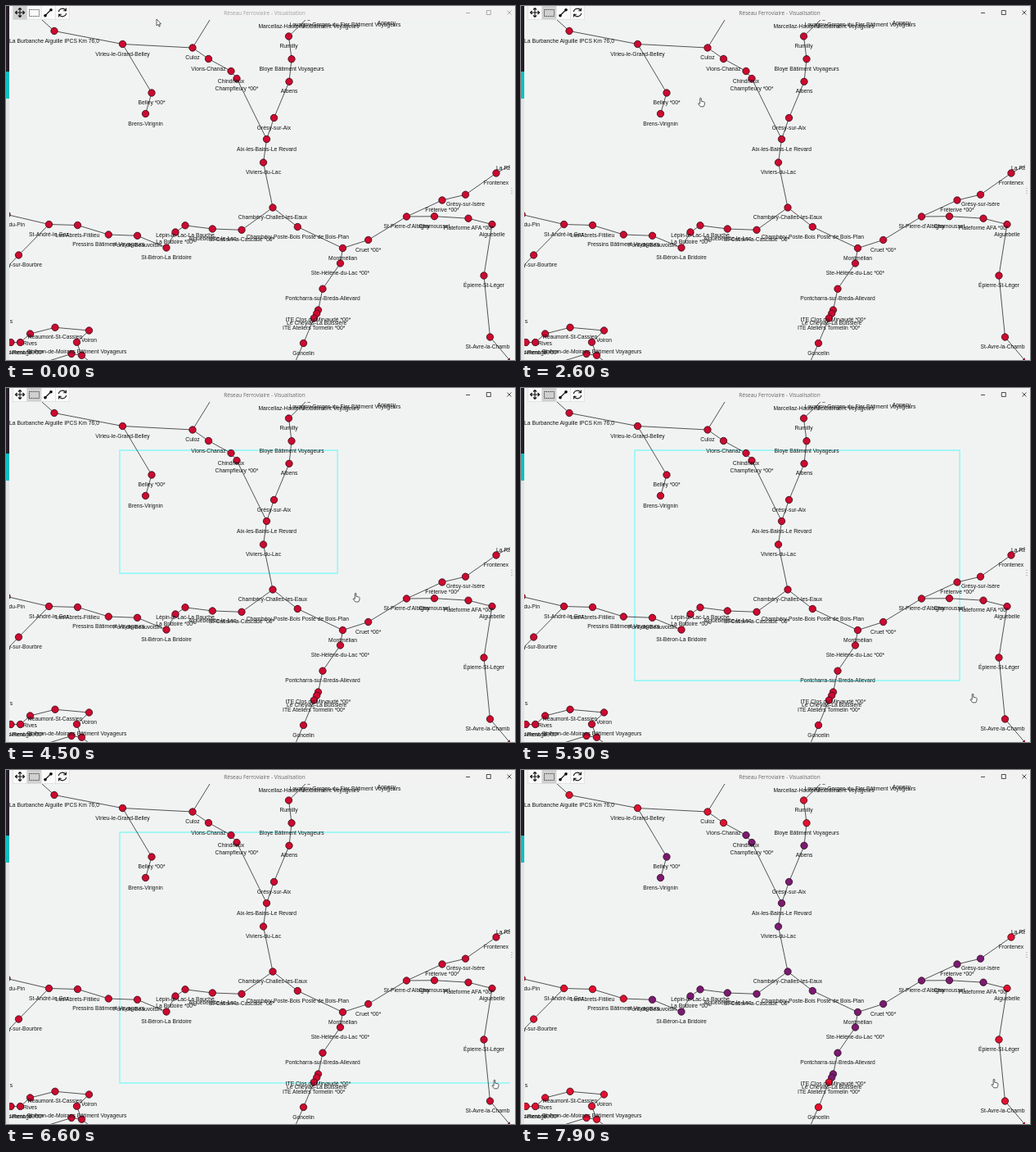
Recreate the animation shown at these times as an HTML page. Size 622 by 432 pixels, loop 8 s.

```html
<!DOCTYPE html>
<html lang="fr">
<head>
<meta charset="utf-8">
<title>Réseau Ferroviaire - Visualisation</title>
<style>
  html, body { margin: 0; width: 100%; height: 100%; overflow: hidden; background: #f1f3f2; }
  svg { display: block; width: 622px; height: 432px; }
  text { font: 6.75px "Liberation Sans", Arial, sans-serif; fill: #151515; text-anchor: middle; }
  #title { font: 6.5px "Open Sans", sans-serif; }
  #tracks path { fill: none; stroke: #2a2a2a; stroke-width: .8; }
  #stations circle { stroke: #2a1018; stroke-width: .8; }
  #icons path { fill: none; stroke: #111; stroke-width: 1.1; }
  #selection { fill: none; stroke: #8ff9f8; stroke-width: 1.6; }
  .cursor { fill: #fff; stroke: #333; stroke-width: .8; stroke-linejoin: round; }
</style>
</head>
<body>
<svg viewBox="0 0 622 432">
  <defs><clipPath id="view"><rect x="4" y="17" width="612" height="415"/></clipPath></defs>
  <rect width="622" height="432" fill="#f1f3f2"/>
  <g clip-path="url(#view)">
    <rect id="selection"/>
    <g id="tracks"></g>
    <g id="stations"></g>
    <g id="labels"></g>
  </g>
  <rect width="622" height="17" fill="#f2f2f2"/>
  <rect width="4" height="432" fill="#e1e5e5"/>
  <rect width="4" height="80" fill="#241f29"/>
  <rect y="80" width="4" height="33" fill="#10bfc0"/>
  <path d="M618 222v1M618 225v1M618 228v1" stroke="#888"/>
  <g id="buttons" stroke="#d8d8d8" stroke-width=".6"></g>
  <g id="icons">
    <path d="M17 2.5v11M11.5 8h11M15 4.5l2-2 2 2M15 11.5l2 2 2-2M13.5 6l-2 2 2 2M20.5 6l2 2-2 2"/>
    <path d="M28.5 4.5h12v8h-12z" stroke-dasharray="1.2 1" style="stroke-width:.8"/>
    <path d="M48 11.5l7-7"/>
    <circle cx="48" cy="11.7" r="1.8"/><circle cx="55" cy="4.7" r="1.8"/>
    <path d="M64.3 7a4.8 4.8 0 0 1 8.6-1.8M73.7 9a4.8 4.8 0 0 1-8.6 1.8M73.4 2.5v3.2h-3.2M64.6 13.5v-3.2h3.2"/>
  </g>
  <text id="title" x="316" y="10.6">Réseau Ferroviaire - Visualisation</text>
  <path id="controls" d="M562 8.5h5M587.3 5.5h5v5h-5zM612.5 5.5l5 5M617.5 5.5l-5 5" fill="none" stroke-width=".8"/>
  <path id="arrow" class="cursor" d="M0 0v8l1.8-1.6 1.2 2.8 1.3-.6-1.2-2.6h2.5z"/>
  <path id="hand" class="cursor" d="M-.8 .6q.8-1 1.6 0v3.6l3.6.9q.8.3.7 1.2l-.5 2.6-.9 1.9h-3.9l-2.9-3.6q.5-1.1 2.3.1z"/>
</svg>
<script>
const LOOP = 8000, CLICK = 1300, PRESS = 4000, RELEASE = 7700;
const ANCHOR = [139, 76];
const $ = id => document.getElementById(id);

function add(parent, tag, attrs, content) {
  const el = document.createElementNS('http://www.w3.org/2000/svg', tag);
  for (const key in attrs) el.setAttribute(key, attrs[key]);
  if (content) el.textContent = content;
  $(parent).append(el);
  return el;
}

const stations = {
  burbanche: [59, 30.5, 'La Burbanche Aiguille IPCS Km 76,0'],
  virieu: [142.5, 46.5, 'Virieu-le-Grand-Belley'],
  culoz: [228, 51, 'Culoz'],
  vions: [247.5, 64.5, 'Vions-Chanaz'],
  chindrieux: [275, 79.5, 'Chindrieux'],
  champfleury: [282, 88.5, 'Champfleury *00*'],
  belley: [178, 106, 'Belley *00*'],
  brens: [170.5, 131.5, 'Brens-Virignin'],
  annecy: [465, 8.5, 'Annecy'],
  lovagny: [414.5, 10.5, 'Lovagny-Gorges-du-Fier Bâtiment Voyageurs'],
  marcellaz: [370, 13, 'Marcellaz-Hauteville Bâtiment Voyageurs'],
  rumilly: [345.5, 37, 'Rumilly'],
  bloye: [349, 64.7, 'Bloye Bâtiment Voyageurs'],
  albens: [346, 92.3, 'Albens'],
  gresyAix: [327.5, 136.5, 'Grésy-sur-Aix'],
  aix: [318.5, 162.5, 'Aix-les-Bains-Le Revard'],
  viviers: [314.5, 191, 'Viviers-du-Lac'],
  chambery: [326, 246, 'Chambéry-Challes-les-Eaux'],
  poste: [356.3, 269.5, 'Chambéry-Poste-Bois Poste de Bois-Plan'],
  cassin: [288, 273.3, 'St-Cassin-la-Cascade *00*'],
  aiguebelette: [252.3, 272, 'Aiguebelette-le-Lac'],
  lepin: [219, 267.8, 'Lépin-le-Lac-La Bauche'],
  bridoire: [207, 276, 'La Bridoire *00*'],
  beron: [196, 295, 'St-Béron-La Bridoire'],
  beauvoisin: [160.5, 280.3, 'Pont-de-Beauvoisin'],
  pressins: [125.3, 279, 'Pressins Bâtiment Voyageurs'],
  abrets: [87.5, 267.5, 'Les Abrets-Fitilieu'],
  andre: [52.5, 266.5, 'St-André-le-Gaz'],
  tour: [1, 254.5, 'La Tour-du-Pin'],
  bourbre: [15.5, 304, ''],
  reaumont: [60, 392.3, 'Réaumont-St-Cassien'],
  rives: [29.5, 400, 'Rives'],
  renage: [17.5, 410.5, 'Rives-Renage *00*'],
  izeaux: [6, 410.5, 'Izeaux Bâtiment *00*'],
  voiron: [101.5, 396, 'Voiron'],
  moirans: [86.5, 410.3, 'St-Jean-de-Moirans Bâtiment Voyageurs'],
  southA: [80, 424.5, ''],
  southB: [92.5, 426.3, ''],
  montmelian: [411.5, 295.5, 'Montmélian'],
  cruet: [442.7, 285.5, 'Cruet *00*'],
  helene: [408.5, 314, 'Ste-Hélène-du-Lac *00*'],
  pontcharra: [387, 345.2, 'Pontcharra-sur-Breda-Allevard'],
  clos: [381.5, 371, 'ITE Clos du Mirvaudé *00*'],
  cheylas: [379.7, 375.3, 'Le Cheylas-La Buissière'],
  ateliers: [376.3, 381, 'ITE Ateliers Tormelin *00*'],
  goncelin: [363.5, 411.5, 'Goncelin'],
  pierre: [489.5, 257, "St-Pierre-d'Albigny"],
  chamousset: [523.5, 256.7, 'Chamousset'],
  plateforme: [565, 259.2, 'Plateforme AFA *00*'],
  aiguebelle: [594, 266.5, 'Aiguebelle'],
  epierre: [584, 329, 'Épierre-St-Léger'],
  avre: [591.5, 404, 'St-Avre-la-Chambre'],
  chambre: [617, 434, ''],
  freterive: [533, 237, 'Fréterive *00*'],
  gresyIsere: [561.5, 230.2, 'Grésy-sur-Isère'],
  frontenex: [599, 204, 'Frontenex'],
};

// Route stops are station keys or "x,y" points beyond the view.
const routes = [
  '44,17 burbanche virieu culoz 249,17',
  'virieu belley brens',
  'culoz vions chindrieux champfleury aix',
  'marcellaz rumilly bloye albens gresyAix aix viviers chambery poste montmelian',
  'chambery cassin aiguebelette lepin bridoire beron beauvoisin pressins abrets andre tour',
  'andre bourbre 0,320',
  'izeaux renage rives reaumont voiron moirans southB southA 30,440',
  'southB 110,440',
  'montmelian cruet pierre chamousset plateforme aiguebelle epierre avre chambre',
  'pierre freterive gresyIsere frontenex 617,194',
  'montmelian helene pontcharra clos cheylas ateliers goncelin 351,440',
];
for (const route of routes) {
  const points = route.split(' ').map(stop => stations[stop] ? stations[stop].slice(0, 2) : stop);
  add('tracks', 'path', { d: 'M' + points.join('L') });
}

const dots = Object.values(stations).map(([x, y, name]) => {
  if (name) add('labels', 'text', { x, y: y + 14 }, name);
  return { x, y, el: add('stations', 'circle', { cx: x, cy: y, r: 4.2 }) };
});
add('labels', 'text', { x: 44, y: 318, style: 'text-anchor:end' }, 'y-sur-Bourbre');
add('labels', 'text', { x: 8, y: 386.5, style: 'text-anchor:end' }, 's');
add('labels', 'text', { x: 599, y: 200, style: 'text-anchor:start' }, 'La Rav');

const buttons = [0, 1, 2, 3].map(i =>
  add('buttons', 'rect', { x: 8.5 + i * 17.3, y: -1, width: 17.3, height: 17.5 }));

// Keyframes: time, x, y
const pointer = [
  [100, 184, 16], [1000, 34, 8], [2100, 34, 8], [2600, 219.5, 112], [2900, 222, 113],
  [3000, 222, 113], [3400, 139, 74], [4000, 139, 74], [4500, 427, 250], [4800, 475, 305],
  [5300, 552, 373], [5450, 561, 384], [5800, 545, 406], [6200, 604, 394], [6450, 614, 382],
  [6600, 597, 378], [7200, 578, 377], [7900, 578, 377],
];
const corner = [
  [4000, ...ANCHOR], [4100, 160, 88], [4500, 405, 226], [4800, 465, 294], [5300, 536, 357],
  [5500, 552, 374], [5800, 537, 393], [6200, 590, 394], [6500, 619, 385], [6600, 618, 382],
  [6750, 597, 378], [7300, 577, 377],
];

function sample(keys, t) {
  const next = keys.findIndex(key => key[0] > t);
  if (next === 0) return keys[0].slice(1);
  if (next < 0) return keys[keys.length - 1].slice(1);
  const [t0, x0, y0] = keys[next - 1], [t1, x1, y1] = keys[next];
  const k = (t - t0) / (t1 - t0);
  return [x0 + (x1 - x0) * k, y0 + (y1 - y0) * k];
}

function render(t) {
  const [px, py] = sample(pointer, t);
  const [cx, cy] = sample(corner, t);
  const active = t >= CLICK, selected = t >= RELEASE;

  $('title').style.fill = active ? '#666' : '#a0a0a0';
  $('controls').style.stroke = active ? '#222' : '#999';
  buttons.forEach((button, i) => button.setAttribute('fill', i === +active ? '#d0d0d0' : '#fafafa'));

  const onMap = active && py > 17;
  for (const [id, shown] of [['hand', onMap], ['arrow', !onMap]]) {
    $(id).style.display = shown ? '' : 'none';
    $(id).setAttribute('transform', `translate(${px} ${py})`);
  }

  const box = $('selection');
  box.style.display = t > PRESS && !selected ? '' : 'none';
  const size = { x: ANCHOR[0], y: ANCHOR[1], width: cx - ANCHOR[0], height: cy - ANCHOR[1] };
  for (const key in size) box.setAttribute(key, Math.max(0, size[key]));

  for (const { x, y, el } of dots) {
    const inside = x > ANCHOR[0] && x < cx && y > ANCHOR[1] && y < cy;
    el.setAttribute('fill', !selected ? '#cd0a30' : inside ? '#7b1a72' : '#e3102f');
  }
}

const start = performance.now();
function tick() {
  render((performance.now() - start) % LOOP);
  requestAnimationFrame(tick);
}
tick();
</script>
</body>
</html>
```
